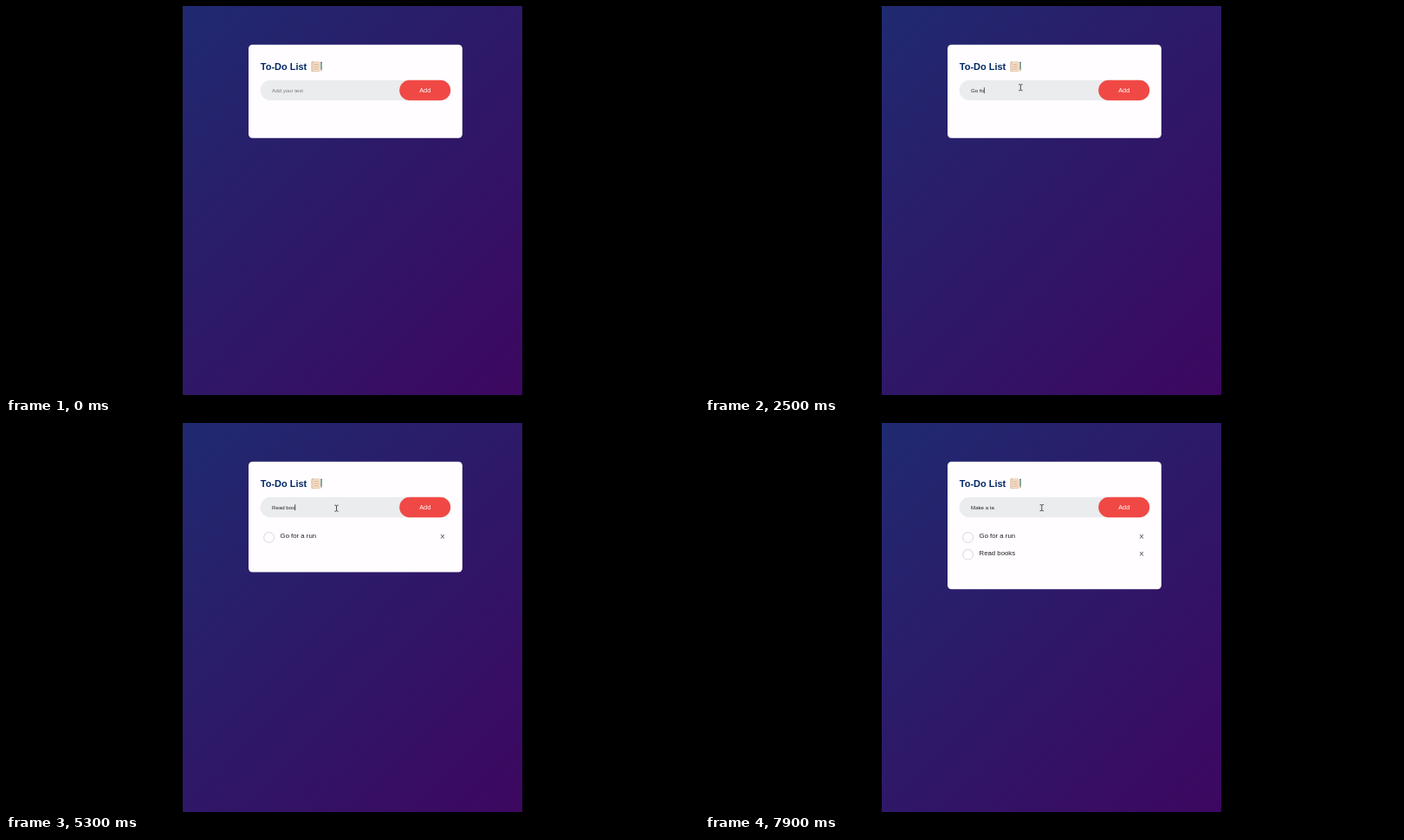
Animation of 800 by 450 pixels, one loop 8 s. Source, as an HTML page:

```html
<!DOCTYPE html>
<html lang="en">
<head>
<meta charset="utf-8">
<title>To-Do List</title>
<style>
  html, body { margin: 0; width: 100%; height: 100%; overflow: hidden; background: #000; }
  svg { display: block; width: 100vw; height: 100vh; }
  text { font-family: "Liberation Sans", Arial, sans-serif; white-space: pre; }
  .title { font-size: 10.97px; font-weight: 700; fill: #002765; }
  .field { font-size: 6.1px; }
  .button { font-size: 7.32px; fill: #fff; text-anchor: middle; }
  .item text { font-size: 7.77px; fill: #222; }
  .item .close { font-size: 10px; fill: #555; text-anchor: middle; }
  .hint text { font: 600 6px Inter, sans-serif; fill: #eee; }
</style>
</head>
<body>
<svg viewBox="0 0 800 450">
  <defs>
    <linearGradient id="sky" gradientUnits="userSpaceOnUse" x1="189.5" y1="14.5" x2="610.5" y2="435.5">
      <stop stop-color="#1f2a70"/>
      <stop offset="1" stop-color="#3d0760"/>
    </linearGradient>
    <clipPath id="page"><rect x="204" width="392" height="450"/></clipPath>
  </defs>
  <rect width="800" height="450"/>
  <rect x="204" width="392" height="450" fill="url(#sky)"/>
  <rect id="card" x="280" y="44.7" width="246.8" height="108" rx="4.5" fill="#fffdff"/>

  <text class="title" x="293.8" y="73.8">To-Do List</text>
  <g stroke-linecap="round" fill="none">
    <rect x="352.6" y="64.7" width="9.4" height="11" rx=".8" fill="#f5dfc8" stroke="#d3b89d" stroke-width=".6"/>
    <path d="M354.2 65v10.4" stroke="#c9a78b" stroke-width=".7" stroke-dasharray=".4 1.3"/>
    <path d="M356.2 67.6h3.8M356.2 70.2h3.8M356.2 72.8h3.8" stroke="#d59c7c" stroke-width=".7"/>
    <path d="M364 66.2v7.4" stroke="#87a69a" stroke-width="2" stroke-linecap="butt"/>
    <path d="M364 64.7v1.5" stroke="#536b83" stroke-width="1.8" stroke-linecap="butt"/>
    <path d="M363 73.6h2l-1 2.3z" fill="#c9a380"/>
  </g>

  <rect x="293.6" y="85.8" width="219.6" height="23.4" rx="11.7" fill="#eaecee"/>
  <text id="field" class="field" x="307.1" y="99.7"></text>
  <rect id="caret" y="94.2" width=".7" height="6.9" fill="#111"/>
  <rect x="454.2" y="85.8" width="59" height="23.4" rx="11.7" fill="#f04945"/>
  <text class="button" x="483.7" y="100.1">Add</text>

  <g id="list"></g>

  <g id="hint" class="hint">
    <path d="M353.4 110.5l3.1-3.5q.8-.8 1.6 0l3.2 3.5z" fill="#1e1d20"/>
    <rect x="347.9" y="109.6" width="72" height="20.6" rx="3" fill="#1e1d20"/>
    <text x="353.2" y="122.1">hello</text>
  </g>

  <g clip-path="url(#page)"><g id="cursor">
    <path id="beam" d="M-2.2-3.5Q-.3-3.5 0-2.8 .3-3.5 2.2-3.5M0-2.8V2.9M-2.2 3.6Q-.3 3.6 0 2.9 .3 3.6 2.2 3.6" fill="none" stroke="#222" stroke-width=".8"/>
    <path id="arrow" d="M0 0V7.4l1.7-1.5 1.2 2.7 1.2-.5-1.2-2.7h2.3z" fill="#111" stroke="#fff" stroke-width=".6"/>
    <path id="hand" d="M-.8 4V-.3q.8-1 1.5 0V2.5l3 .7q.8.2.7 1l-.6 3.6H.2L-2.4 4.8q.2-1 1.6 0z" fill="#fff" stroke="#111" stroke-width=".6"/>
  </g></g>
</svg>
<script>
const LOOP = 8000, TICK = 100, ROW = 19.8;
const $ = id => document.getElementById(id);
const show = (el, on) => el.setAttribute("visibility", on ? "visible" : "hidden");
const within = (t, from, to) => t >= from && t < to;

const tasks = [
  { text: "Go for a run", focus: 1600, type: 2000, step: 107, pauseAt: Infinity, added: 3800 },
  { text: "Read books", focus: 4200, type: 4500, step: 100, pauseAt: 4900, added: 5800 },
  { text: "Make a ta", focus: 6400, type: 7000, step: 100, pauseAt: 7800, added: Infinity }
];
const hints = [[1700, 2000], [4300, 4500], [6500, 7000]];

// Pointer stops: time, x, y
const stops = [
  [600, 604, 150], [1400, 364.3, 94.2], [3300, 364.3, 94.2], [3700, 479, 98],
  [3800, 479, 98], [4200, 381.5, 98.6], [5400, 381.5, 98.6], [5700, 477, 98],
  [5800, 477, 98], [6200, 389.3, 98], [6400, 389.3, 98], [6600, 388.8, 98]
];

const rows = tasks.slice(0, 2).map((task, i) => {
  const row = document.createElementNS("http://www.w3.org/2000/svg", "g");
  row.setAttribute("class", "item");
  row.setAttribute("transform", `translate(0 ${i * ROW})`);
  row.innerHTML = `<circle cx="303.6" cy="132.4" r="5.9" fill="#fffdff" stroke="#d2d1d5" stroke-width=".9"/>
    <text x="316.6" y="133.3">${task.text}</text><text class="close" x="503.8" y="135.2">×</text>`;
  $("list").append(row);
  return row;
});

function typedCount(task, t) {
  if (t < task.type) return 0;
  const paused = t >= task.pauseAt ? TICK : 0;
  return Math.min(task.text.length, Math.floor((t - task.type - paused) / task.step) + 1);
}

function pointerAt(t) {
  const next = stops.findIndex(s => s[0] > t);
  if (next < 0) return stops.at(-1).slice(1);
  if (next === 0) return stops[0].slice(1);
  const [a, b] = [stops[next - 1], stops[next]];
  const p = (t - a[0]) / (b[0] - a[0]);
  const ease = p * p * (3 - 2 * p);
  return [1, 2].map(i => a[i] + (b[i] - a[i]) * ease);
}

function drawField(t) {
  const task = tasks.find(task => t < task.added);
  const typed = task.text.slice(0, typedCount(task, t));
  const field = $("field");
  field.textContent = typed || "Add your text";
  field.setAttribute("fill", typed ? "#222" : "#777");
  const width = typed ? field.getComputedTextLength() : 0;
  $("caret").setAttribute("x", 307 + width);
  const blinkedOff = within(t, 4300, 4500) || t >= 7900;
  show($("caret"), t >= task.focus && !blinkedOff);
}

function drawPointer(t) {
  const [x, y] = pointerAt(t);
  const inBar = y > 86 && y < 109 && x > 294 && x < 513;
  const shape = !inBar ? "arrow" : x > 454 ? "hand" : "beam";
  for (const id of ["arrow", "hand", "beam"]) show($(id), t >= 600 && id === shape);
  $("cursor").setAttribute("transform", `translate(${x} ${y})`);
}

function draw(now) {
  const t = Math.floor(now % LOOP / TICK) * TICK;
  const count = rows.filter((row, i) => {
    const added = t >= tasks[i].added;
    show(row, added);
    return added;
  }).length;
  $("card").setAttribute("height", 108 + count * ROW);
  drawField(t);
  show($("hint"), hints.some(([from, to]) => within(t, from, to)));
  drawPointer(t);
}

const start = performance.now();
function loop() {
  draw(performance.now() - start);
  requestAnimationFrame(loop);
}
loop();
</script>
</body>
</html>
```
